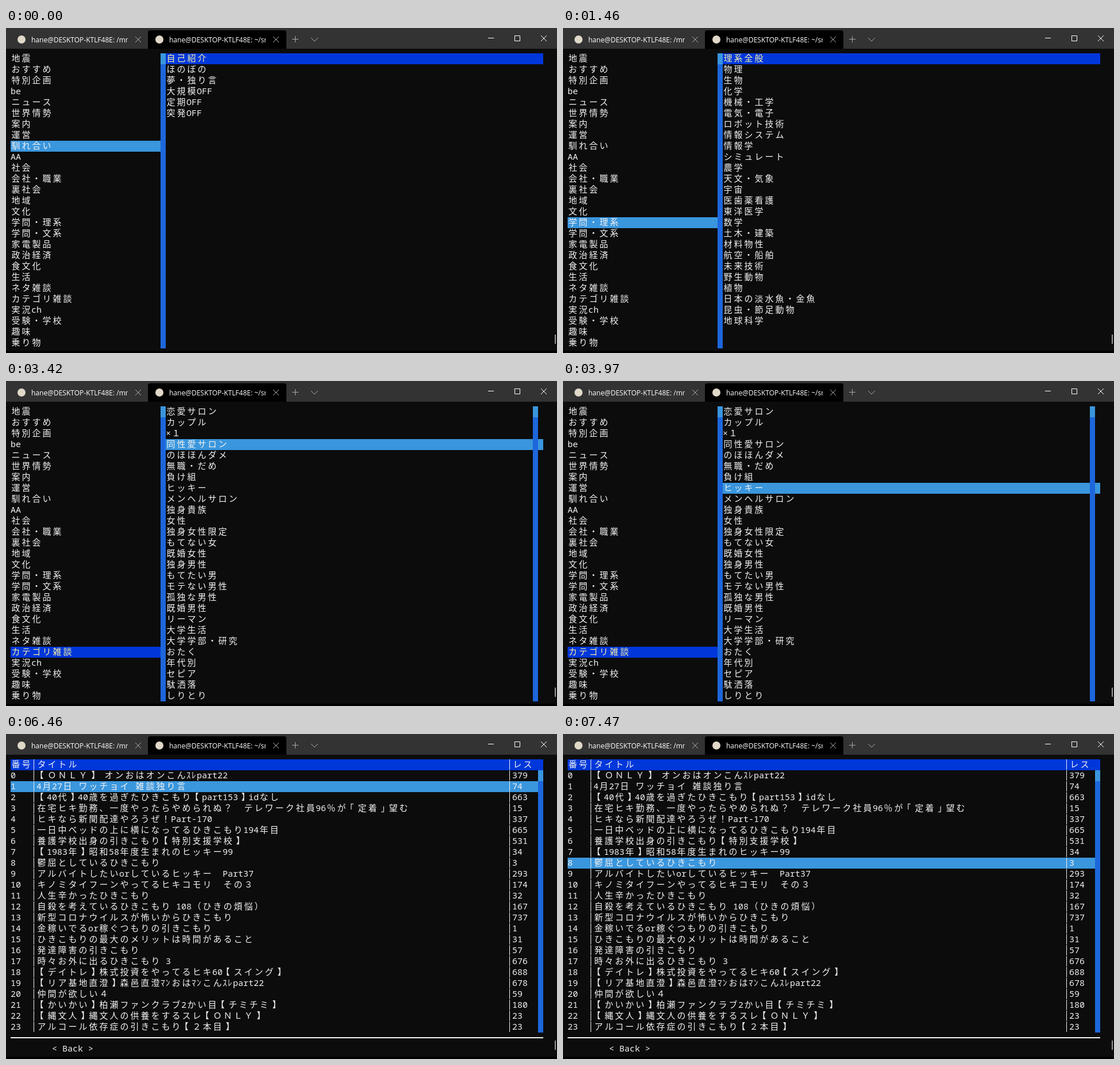
These frames come from a looping animation (959x565 px, 8 s). An HTML page with a canvas:

```html
<!DOCTYPE html>
<html lang="ja">
<head>
<meta charset="utf-8">
<title>Board browser</title>
<style>
html, body { margin: 0; height: 100%; overflow: hidden; background: #0c0c0c; }
canvas { display: block; }
</style>
</head>
<body>
<canvas id="stage" width="959" height="565"></canvas>
<script>
const ctx = document.getElementById('stage').getContext('2d');
const LOOP = 8000, CELL = 9, ROW = 19, LEFT = 8, TOP = 44, ROWS = 27;
const BG = '#0c0c0c', WHITE = '#f2f2f2', YELLOW = '#f9f1a5', BLUE = '#0037da', CYAN = '#3a96dd';
const TERM_FONT = '500 15px "Noto Sans Mono", "Noto Sans CJK JP", "Noto Sans CJK", monospace';
const TAB_FONT = '12px "Open Sans", "Noto Sans", sans-serif';
const WIDE = /[^\x00-\xff｡-ﾟ]/;

const categories = ('地震 おすすめ 特別企画 be ニュース 世界情勢 案内 運営 馴れ合い AA 社会 会社・職業 裏社会 地域 文化 ' +
  '学問・理系 学問・文系 家電製品 政治経済 食文化 生活 ネタ雑談 カテゴリ雑談 実況ch 受験・学校 趣味 乗り物').split(' ');

// Boards of the categories from 馴れ合い to カテゴリ雑談
const FIRST = 8;
const boards = [
  '自己紹介 ほのぼの 夢・独り言 大規模OFF 定期OFF 突発OFF',
  'AAサロン 顔文字 AA長編 アスキーアート',
  '事件・事故 裁判・司法 少年犯罪 防犯 消防 警察 自衛隊 教育・先生 福祉 環境・電力 災害 ボランティア 人権問題 社会・出来事',
  '就職 転職 派遣業界 アルバイト 経営学 起業 資格全般 会計全般 法律勉強 公務員 公務員試験 国家試験 医者 病院・医者 看護 薬剤師 介護 ' +
  '通信業界 電力業界 金融業界 不動産 物流業界 建設住宅業界 運輸・交通 食品業界 出版業界 印刷業界 農林水産業 リストラ',
  '裏社会 アウトロー 探偵・調査 お水 夜のお仕事',
  '北海道 東北 関東 甲信越 東海 北陸 近畿 中国 四国 九州 沖縄 海外生活 危ない海外 まちおこし',
  '文学 創作文芸 詩・ポエム 一般書籍 ミステリー SF・ホラー 絵本 児童書 美術鑑賞 演劇・役者 伝統芸能 古典芸能 工芸 書道 茶道 華道',
  '理系全般 物理 生物 化学 機械・工学 電気・電子 ロボット技術 情報システム 情報学 シミュレート 農学 天文・気象 宇宙 医歯薬看護 ' +
  '東洋医学 数学 土木・建築 材料物性 航空・船舶 未来技術 野生動物 植物 日本の淡水魚・金魚 昆虫・節足動物 地球科学',
  '文系全般 人類学 日本史 世界史 日本近代史 古代・日本史 戦国時代 三国志・戦国 考古学 民俗・神話 地理・人類学 占術理論 言語学 外国語 ' +
  '英語 ハングル 中国語 古文・漢文 心理学 哲学 宗教 社会学 経済学 法学 教育学',
  '家電製品 生活家電 AV機器 ピュアAU デジカメ ビデオカメラ 携帯機種 携帯電話ゲー 電話・FAX ポータブルAV 車載機器 照明 時計・小物',
  '政治 議員・選挙 政治思想 国際情勢 経済 株式 株個別銘柄 市況１ 市況２ 投資一般 先物 外国為替 保険業界 税金経理会計 家計・節約 貧乏',
  '料理 レシピ 食べ物 菓子・甘味 ラーメン うどん・そば そば・うどん カレー 寿司 丼 パン 米 鍋物 焼肉 漬物 調味料 お茶・珈琲 酒・Bar ' +
  '日本酒 ワイン 居酒屋 外食 弁当 グルメ外食',
  '生活全般 生活サロン 育児 家事・掃除 買い物 通販・買い物 100円ショップ 家具・収納 一人暮らし 引越し 住宅・賃貸 園芸 冠婚葬祭 ' +
  '健康 ダイエット 美容 化粧 ファッション 髪型 安全・防災',
  'ネタ雑談 なんでも質問 クイズ雑学 百物語 オカルト 迷言・珍言 なぞなぞ 最悪 厨房',
  '恋愛サロン カップル ×１ 同性愛サロン のほほんダメ 無職・だめ 負け組 ヒッキー メンヘルサロン 独身貴族 女性 独身女性限定 もてない女 ' +
  '既婚女性 独身男性 もてたい男 モテない男性 孤独な男性 既婚男性 リーマン 大学生活 大学学部・研究 おたく 年代別 セピア 駄洒落 しりとり 詩'
].map(list => list.split(' '));

// Title|number of replies
const threads = `【ＯＮＬＹ】 オンおはオンこんｽﾚpart22|379
4月27日 ワッチョイ 雑談独り言|74
【40代】40歳を過ぎたひきこもり【part153】idなし|663
在宅ヒキ勤務、一度やったらやめられぬ？　テレワーク社員96％が「定着」望む|15
ヒキなら新聞配達やろうぜ！Part-170|337
一日中ベッドの上に横になってるひきこもり194年目|665
養護学校出身の引きこもり【特別支援学校】|531
【1983年】昭和58年度生まれのヒッキー99|34
鬱屈としているひきこもり|3
アルバイトしたいorしているヒッキー　Part37|293
キノミタイフーンやってるヒキコモリ　その３|174
人生辛かったひきこもり|32
自殺を考えているひきこもり 108（ひきの煩悩）|167
新型コロナウイルスが怖いからひきこもり|737
金稼いでるor稼ぐつもりの引きこもり|1
ひきこもりの最大のメリットは時間があること|31
発達障害の引きこもり|57
時々お外に出るひきこもり 3|676
【デイトレ】株式投資をやってるヒキ60【スイング】|688
【リア基地直澄】森邑直澄ﾏﾝおはﾏﾝこんｽﾚpart22|678
仲間が欲しい４|59
【かいかい】柏瀬ファンクラブ2かい目【チミチミ】|180
【縄文人】縄文人の供養をするスレ【ＯＮＬＹ】|23
アルコール依存症の引きこもり【２本目】|23`.split('\n').map(line => line.split('|'));

const colX = col => LEFT + col * CELL;
const rowY = row => TOP + row * ROW;

function box(x, y, w, h, color) {
  ctx.fillStyle = color;
  ctx.fillRect(x, y, w, h);
}

function bar(col, row, cols, color) {
  box(colX(col), rowY(row), cols * CELL, ROW, color);
}

// Wide glyphs are centred in two cells; brackets fill only half their glyph box
function inset(ch) {
  if ('【「'.includes(ch)) return -2.5;
  if ('】」'.includes(ch)) return 5.5;
  return WIDE.test(ch) ? 1.5 : 0;
}

function print(text, col, row, color = WHITE) {
  ctx.font = TERM_FONT;
  ctx.fillStyle = color;
  for (const ch of text) {
    ctx.fillText(ch, colX(col) + inset(ch), rowY(row) + 14);
    col += WIDE.test(ch) ? 2 : 1;
  }
}

const dots = (() => {
  const tile = document.createElement('canvas');
  tile.width = tile.height = 2;
  const c = tile.getContext('2d');
  c.fillStyle = BLUE;
  c.fillRect(0, 0, 2, 2);
  c.fillStyle = CYAN;
  c.fillRect(0, 0, 1, 1);
  c.fillRect(1, 1, 1, 1);
  return ctx.createPattern(tile, 'repeat');
})();

function scrollbar(col, row, rows) {
  box(colX(col), rowY(row), CELL, rows * ROW, dots);
  bar(col, row, 1, CYAN);
}

function strokes(color, ...lines) {
  ctx.strokeStyle = color;
  ctx.lineWidth = 1;
  ctx.beginPath();
  for (const [x, y, ...rest] of lines) {
    ctx.moveTo(x, y);
    for (let i = 0; i < rest.length; i += 2) ctx.lineTo(rest[i], rest[i + 1]);
  }
  ctx.stroke();
}

function cross(x, y, color) {
  strokes(color, [x - 5, y - 5, x + 5, y + 5], [x + 5, y - 5, x - 5, y + 5]);
}

function tab(x, title) {
  ctx.fillStyle = '#e0d8c8';
  ctx.beginPath();
  ctx.arc(x + 27, 20, 7, 0, 7);
  ctx.fill();
  ctx.save();
  ctx.beginPath();
  ctx.rect(x + 44, 4, 168, 32);
  ctx.clip();
  ctx.font = TAB_FONT;
  ctx.fillStyle = '#fff';
  ctx.fillText(title, x + 44, 25);
  ctx.restore();
  cross(x + 230, 20, '#aaa');
}

function drawWindow() {
  box(0, 0, 959, 565, BG);
  box(0, 561, 959, 4, '#000');
  box(0, 0, 959, 36, '#333');
  ctx.fillStyle = '#000';
  ctx.beginPath();
  ctx.roundRect(247, 4, 241, 32, [4, 4, 0, 0]);
  ctx.fill();
  tab(0, 'hane@DESKTOP-KTLF48E: /mnt');
  tab(240, 'hane@DESKTOP-KTLF48E: ~/src');
  strokes('#aaa', [498, 19.5, 509, 19.5], [503.5, 14, 503.5, 25], [531, 17, 537, 23, 543, 17]);
  strokes('#fff', [839, 17.5, 849, 17.5], [885.5, 13.5, 894.5, 13.5, 894.5, 22.5, 885.5, 22.5, 885.5, 13]);
  cross(936, 18, '#fff');
  box(955, 533, 2, 16, '#999');
}

function list(items, col, cols, selected, focused) {
  bar(col, selected, cols, focused ? CYAN : BLUE);
  items.slice(0, ROWS).forEach((item, i) =>
    print(item, col, i, i === selected && !focused ? YELLOW : WHITE));
}

function drawBoards(category, board, inBoards) {
  const items = boards[category - FIRST];
  list(categories, 0, 29, category, !inBoards);
  scrollbar(29, 0, ROWS);
  list(items, 30, 73, board, inBoards);
  if (items.length > ROWS) scrollbar(101, 0, ROWS);
}

function drawThreads(selected) {
  bar(0, 0, 103, BLUE);
  bar(0, selected + 1, 102, CYAN);
  [['番号', 'タイトル', 'レス'], ...threads.map(([title, count], i) => [String(i), title, count])]
    .forEach(([number, title, count], row) => {
      print(number, 0, row);
      print(title, 5, row);
      print(count, 97, row);
      for (const col of [4, 96]) box(colX(col) + 4, rowY(row), 1, ROW - 1, WHITE);
    });
  scrollbar(102, 1, 24);
  box(LEFT, 527, 927, 2, WHITE);
  print('< Back >', 8, 26);
}

// Number of n evenly spaced key presses, first to last, made by time t
function presses(t, first, last, n) {
  if (t < first) return 0;
  return Math.min(n, 1 + Math.floor((t - first) / (last - first) * (n - 1) + 1e-6));
}

function draw(t) {
  drawWindow();
  if (t < 5210) {
    const category = FIRST + presses(t, 610, 1460, 7) + presses(t, 1630, 1780, 2) + presses(t, 1918, 2470, 5);
    const board = presses(t, 2870, 3250, 2) + presses(t, 3420, 3570, 2) + presses(t, 3703, 3970, 3);
    drawBoards(category, board, t >= 2720);
  } else if (t >= 5280) {
    drawThreads(presses(t, 6460, 7470, 8));
  }
}

const start = performance.now();
function tick() {
  draw((performance.now() - start) % LOOP);
  requestAnimationFrame(tick);
}
tick();
</script>
</body>
</html>
```
